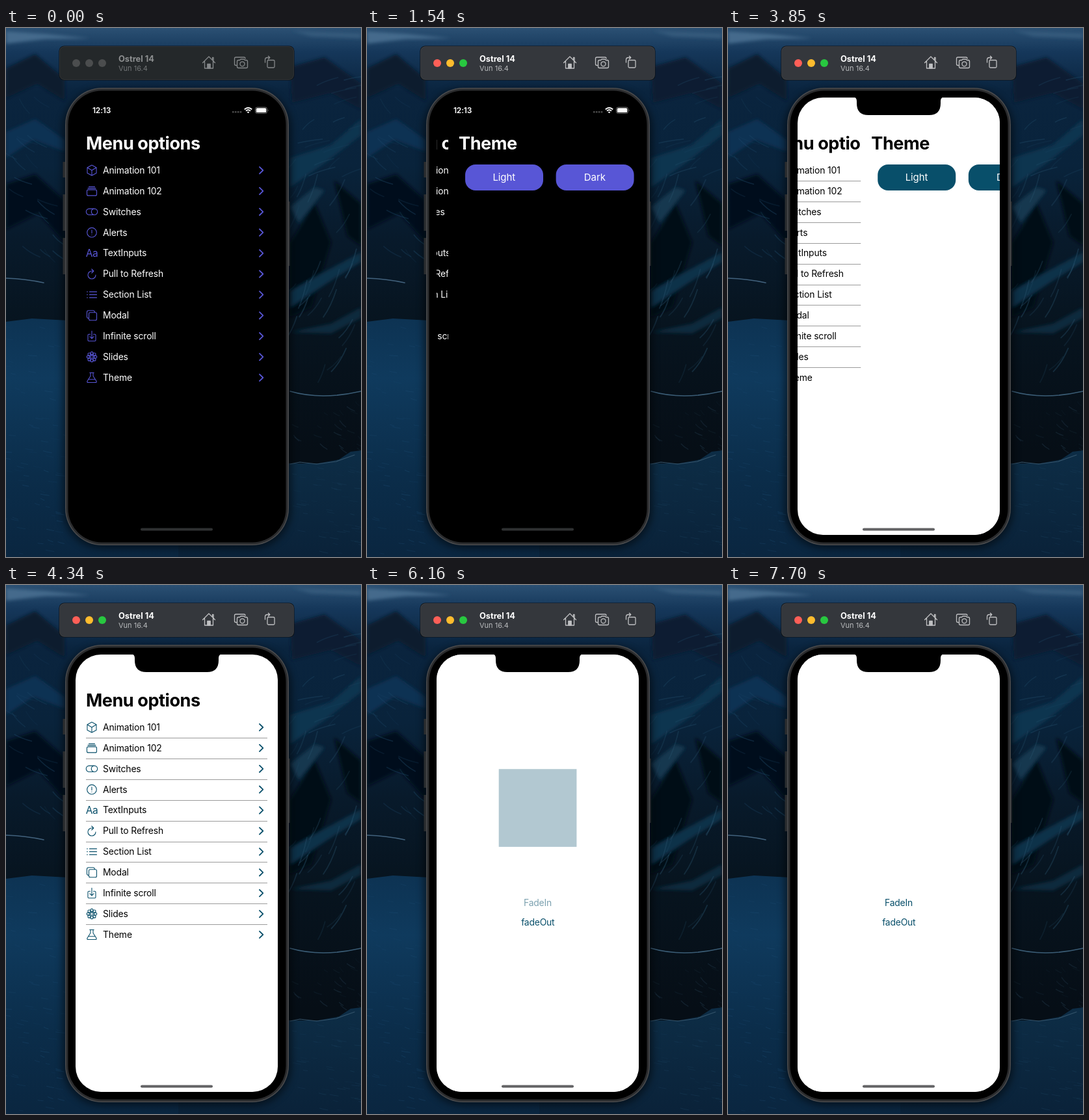
Recreate the animation shown at these times as an HTML page. Size 546x814 px, loop 8 s.

```html
<!DOCTYPE html>
<html lang="en">
<head>
<meta charset="utf-8">
<title>Menu and theme demo</title>
<style>
  html, body { margin: 0; width: 100%; height: 100%; overflow: hidden; background: #0a2035; }
  svg { display: block; width: 546px; height: 814px; font-family: Inter, sans-serif;
        --bg: #000; --fg: #fff; --pri: #5856d6; --line: transparent; --home: #2f3132; }
  svg.light { --bg: #fff; --fg: #000; --pri: #084f6a; --line: #9b9b9b; --home: #636365; }
  svg.light #status { display: none; }
  .bg { fill: var(--bg); }
  .pri { fill: var(--pri); }
  .title { font-size: 27.1px; font-weight: 700; letter-spacing: -.45px; fill: var(--fg); }
  .row text { font-size: 13.9px; letter-spacing: -.13px; fill: var(--fg); }
  .row .aa { font-size: 15.5px; letter-spacing: -.5px; fill: var(--pri); }
  .icon { fill: none; stroke: var(--pri); stroke-width: 1.1; stroke-linecap: round; stroke-linejoin: round; }
  .button text { font-size: 15px; letter-spacing: -.1px; fill: #fff; text-anchor: middle; }
  .link { font-size: 13.9px; letter-spacing: -.2px; fill: var(--pri); text-anchor: middle; }
  #bar { --bar: #34373c; --name: #fff; --sub: #b8babc; --tool: #bfc0c2; }
  #bar.idle { --bar: #24282a; --name: #8d8f90; --sub: #727577; --tool: #85888a; }
  #bar.idle circle.dot { fill: #4b4d4e; }
  .tool { fill: none; stroke: var(--tool); stroke-width: 1.3; stroke-linejoin: round; stroke-linecap: round; }
</style>
</head>
<body>
<svg id="stage" viewBox="0 0 546 814">
  <defs>
    <linearGradient id="land" x2="0" y2="1">
      <stop offset="0" stop-color="#2b5073"/><stop offset=".045" stop-color="#15375a"/>
      <stop offset=".12" stop-color="#0a243e"/><stop offset=".26" stop-color="#09233b"/>
      <stop offset=".4" stop-color="#081a2b"/><stop offset=".56" stop-color="#07141f"/>
      <stop offset=".8" stop-color="#060e16"/>
    </linearGradient>
    <linearGradient id="sea" x2="0" y2="1">
      <stop offset="0" stop-color="#0d3353"/><stop offset=".25" stop-color="#0f3a5d"/>
      <stop offset=".65" stop-color="#0b2d4a"/><stop offset="1" stop-color="#0a2640"/>
    </linearGradient>
    <linearGradient id="cove" x2="0" y2="1">
      <stop offset="0" stop-color="#0d2d46"/><stop offset="1" stop-color="#0a2239"/>
    </linearGradient>
    <filter id="soft" x="-30%" y="-30%" width="160%" height="160%"><feGaussianBlur stdDeviation="2.5"/></filter>
    <filter id="shade" x="-10%" y="-10%" width="120%" height="120%"><feGaussianBlur stdDeviation="6"/></filter>
    <clipPath id="screen"><rect x="107" y="107" width="311" height="673" rx="39"/></clipPath>
  </defs>

  <rect width="546" height="814" fill="url(#land)"/>
  <g filter="url(#soft)">
    <path d="M0 5L60 9L130 16L60 17L0 24Z" fill="#456a8c"/>
    <path d="M440 4L546 8V16L470 13Z" fill="#345a7c"/>
    <path d="M0 62L45 40L90 78V112L48 86L0 108Z" fill="#071a2d"/>
    <path d="M0 160L45 140L90 172V190L42 172L0 200Z" fill="#0d3152"/>
    <path d="M0 240L45 225L90 265V330L50 285L0 310Z" fill="#050f1a"/>
    <path d="M437 60L490 45L546 85V125L500 100L440 115Z" fill="#091c30"/>
    <path d="M437 200L500 180L546 140V165L490 208L437 245Z" fill="#113550"/>
    <path d="M437 275L475 245L490 250L450 300Z" fill="#123850"/>
    <path d="M437 330L475 270L500 330L470 430L437 445Z" fill="#050e17"/>
    <path d="M437 405L490 375L546 345V360L495 392L437 430Z" fill="#113149"/>
    <path d="M505 235L546 270V335L525 320Z" fill="#050f19"/>
    <path d="M437 468L500 455L546 430V446L500 470Z" fill="#102a3e"/>
  </g>
  <g id="ridges" fill="none" stroke-linecap="round"/>
  <path d="M0 452L40 447L95 450L265 640V814H0Z" fill="url(#sea)"/>
  <path d="M265 668L455 670L480 670L512 664L530 652L546 650V814H265Z" fill="url(#cove)"/>
  <g id="ripples" fill="none" stroke-linecap="round"/>
  <g fill="none" stroke-linecap="round">
    <path d="M0 385Q30 386 58 392" stroke="#42627d" stroke-width="1.5"/>
    <path d="M437 559Q485 573 546 559" stroke="#3b5d76" stroke-width="1.6"/>
    <path d="M437 671L452 668L478 671L508 667L536 657" stroke="#34536a" stroke-width="1.2"/>
  </g>

  <rect x="87" y="94" width="352" height="707" rx="61" fill="#000" opacity=".5" filter="url(#shade)"/>
  <path d="M87.500 206h5v24h-5zM87.500 256h5v56h-5zM87.500 323h5v56h-5zM434 267h2.500v99h-2.500z" fill="#2b2d2f"/>
  <rect x="91" y="92" width="344" height="704" rx="57" fill="#4a4b4d"/>
  <rect x="92.500" y="93.500" width="341" height="701" rx="55.500" fill="#2b2c2e"/>
  <rect x="95.500" y="96.500" width="335" height="695" rx="52" fill="#000"/>

  <g clip-path="url(#screen)">
    <g id="menu">
      <rect class="bg" x="107" y="107" width="420" height="673"/>
      <text class="title" x="123" y="187">Menu options</text>
    </g>
    <g id="page">
      <rect class="bg" x="107" y="107" width="311" height="673"/>
      <g id="theme">
        <text class="title" x="123" y="187">Theme</text>
        <g class="button" id="lightBtn"><rect class="pri" x="133" y="210" width="120" height="40" rx="16"/><text x="192.700" y="235.300">Light</text></g>
        <g class="button"><rect class="pri" x="272.600" y="210" width="120" height="40" rx="16"/><text x="332.300" y="235.300">Dark</text></g>
      </g>
      <g id="fade">
        <rect class="pri" id="box" x="202.700" width="119.700" height="119.700"/>
        <text class="link" id="fadeIn" x="262.500" y="493.500">FadeIn</text>
        <text class="link" id="fadeOut" x="262.800" y="523.500">fadeOut</text>
      </g>
    </g>
    <path d="M193 106Q198 107 198 113V116Q198 134 216 134H309Q327 134 327 116V113Q327 107 332 106Z" fill="#000"/>
    <rect x="207" y="769.500" width="111" height="4" rx="2" style="fill:var(--home)"/>
  </g>
  <g id="status" fill="#fff">
    <text x="133" y="131.200" font-size="12" font-weight="600" letter-spacing="-.2">12:13</text>
    <path d="M348 128h2.600v2.400h-2.600zm3.900 0h2.600v2.400h-2.600zm3.900 0h2.600v2.400h-2.600zm3.900 0h2.600v2.400h-2.600z" fill="#4a4a4a"/>
    <g fill="none" stroke="#fff" stroke-width="1.900"><path d="M366.800 125.300Q372.500 120 378.200 125.300M369 127.600Q372.500 124.400 376 127.600"/></g>
    <path d="M370.600 129.200Q372.500 127.600 374.400 129.200L372.500 131.200Z"/>
    <rect x="383.500" y="122" width="18" height="9.400" rx="2.800" fill="none" stroke="#777"/>
    <rect x="384.800" y="123.300" width="15.400" height="6.800" rx="1.600"/>
    <path d="M403 125.200q1.600 1.500 0 3z" fill="#888"/>
  </g>

  <g id="bar">
    <rect x="81.500" y="27.500" width="362" height="53" rx="8" fill="#0a0d10"/>
    <rect x="82.500" y="28.500" width="360" height="51" rx="7" style="fill:var(--bar)" stroke="#fff" stroke-opacity=".1"/>
    <circle class="dot" cx="108" cy="54" r="6" fill="#fe5f57"/>
    <circle class="dot" cx="128" cy="54" r="6" fill="#febc2e"/>
    <circle class="dot" cx="148" cy="54" r="6" fill="#28c840"/>
    <text x="173" y="52" font-size="12.800" font-weight="700" style="fill:var(--name)">Ostrel 14</text>
    <text x="173" y="66" font-size="11" style="fill:var(--sub)">Vun 16.4</text>
    <g class="tool">
      <path d="M302.500 53.500L312 44L321.500 53.500M305.500 51.500V62H318.500V51.500M317.500 49V45.500H319V50.500"/>
      <path d="M309.800 62V55.500H314.200V62Z" style="fill:var(--tool)"/>
      <path d="M354.500 57.500H353.500Q351.500 57.500 351.500 55.500V47Q351.500 45 353.500 45H366Q368 45 368 47"/>
      <path d="M357.500 49.500H359.500L361 48H366L367.500 49.500H369.500Q371.500 49.500 371.500 51.500V59.500Q371.500 61.500 369.500 61.500H357.500Q355.500 61.500 355.500 59.500V51.500Q355.500 49.500 357.500 49.500Z"/>
      <circle cx="363.500" cy="55.300" r="3.500"/>
      <rect x="402" y="49.500" width="11" height="11.500" rx="1.500"/>
      <path d="M398.500 53V49Q398.500 45.500 402 45.500H405.500M403.500 43.200L405.800 45.500L403.500 47.800"/>
    </g>
  </g>
</svg>

<script>
const $ = id => document.getElementById(id);
const circle = (x, y, r) => `M${x - r} ${y}a${r} ${r} 0 1 0 ${2 * r} 0a${r} ${r} 0 1 0 ${-2 * r} 0`;
const petals = [...Array(8).keys()].map(i =>
  circle(5.7 * Math.cos(i * Math.PI / 4), 5.7 * Math.sin(i * Math.PI / 4), 2)).join('');

// Icon paths are centred on 0,0
const rows = [
  ['Animation 101', 'M0-8L7-4.200V4.200L0 8L-7 4.200V-4.200ZM-7-4.200L0 0L7-4.200M0 0V8'],
  ['Animation 102', 'M-4.500-6.500H4.500M-6-4.300H6M-5.500-2H5.500Q7.500-2 7.500 0V5Q7.500 7 5.500 7H-5.500Q-7.500 7-7.500 5V0Q-7.500-2-5.500-2Z'],
  ['Switches', 'M-4-4.700H4A4.700 4.700 0 0 1 4 4.700H-4A4.700 4.700 0 0 1-4-4.700Z' + circle(4, 0, 4.7)],
  ['Alerts', circle(0, 0, 7.3) + 'M0-3.800V1M0 3.600V3.800'],
  ['TextInputs', ''],
  ['Pull to Refresh', 'M6 1.500A6 6 0 1 1 0-4.500H2.500M-.200-7.500L2.800-4.500L-.200-1.500'],
  ['Section List', 'M-3.500-4.500H7.500M-3.500 0H7.500M-3.500 4.500H7.500M-7.300-4.500H-6.700M-7.300 0H-6.700M-7.300 4.500H-6.700'],
  ['Modal', 'M-2.500-4.500H5.500Q7.500-4.500 7.500-2.500V5.500Q7.500 7.500 5.500 7.500H-2.500Q-4.500 7.500-4.500 5.500V-2.500Q-4.500-4.500-2.500-4.500ZM4.500-4.500Q4.500-7.500 2-7.500H-5Q-7.500-7.500-7.500-5V2Q-7.500 4.500-4.500 4.500'],
  ['Infinite scroll', 'M-2.500-3H-4.500Q-6-3-6-1.500V6Q-6 7.500-4.500 7.500H4.500Q6 7.500 6 6V-1.500Q6-3 4.500-3H2.500M0-8V3.500M-3 .600L0 3.600L3 .600'],
  ['Slides', petals + circle(0, 0, 2.2)],
  ['Theme', 'M-3.200-7.500H3.200M-2-7.500V-2.500L-6.800 5Q-8 7.500-5.500 7.500H5.500Q8 7.500 6.800 5L2-2.500V-7.500M-4.800 2.800H4.800'],
];
$('menu').insertAdjacentHTML('beforeend', rows.map(([label, icon], i) => {
  const y = 219 + i * 31.9;
  const mark = icon ? `<path class="icon" transform="translate(132 ${y})" d="${icon}"/>`
                    : `<text class="aa" x="122.800" y="${y + 5.5}">Aa</text>`;
  const rule = i < rows.length - 1 ? `<path d="M123 ${Math.round(y + 16) + .5}h279" style="stroke:var(--line)"/>` : '';
  return `<g class="row" id="row${i}">${mark}<text x="149" y="${y + 4.8}">${label}</text>
    <path class="icon" style="stroke-width:1.8" d="M390 ${y - 5.2}l5.300 5.200l-5.300 5.200"/></g>${rule}`;
}).join(''));

// Wallpaper texture
let seed = 7;
const rand = (a, b) => a + (b - a) * ((seed = seed * 16807 % 2147483647) / 2147483647);
function strokes(n, x0, x1, y0, y1, dx, dy, colour, width) {
  let out = '';
  while (n--) {
    const x = rand(x0, x1), y = rand(y0, y1), w = rand(dx * .4, dx), h = rand(dy * .3, dy);
    out += `<path d="M${x} ${y}q${w * .4} ${h * .6} ${w} ${h}" stroke="${colour}" stroke-width="${width}" opacity="${rand(.1, .4)}"/>`;
  }
  return out;
}
$('ridges').innerHTML =
  strokes(22, -20, 80, 60, 380, 34, 22, '#225070', 1.6) +
  strokes(16, 437, 530, 60, 230, 40, -18, '#24506e', 1.6) +
  strokes(24, 445, 540, 200, 520, -24, 46, '#2b556f', 1.8) +
  strokes(22, 437, 546, 575, 650, 12, 10, '#274052', 1.5);
$('ripples').innerHTML =
  strokes(70, -8, 90, 458, 810, 14, 3, '#1f5078', 1) +
  strokes(50, 437, 546, 675, 810, 14, 3, '#1f4866', 1);

const clamp = x => Math.min(1, Math.max(0, x));
const ease = x => { x = clamp(x); return x * x * (3 - 2 * x); };
// Critically damped spring used by screen transitions
const spring = ms => { const x = Math.max(0, ms) * .01826; return 1 - (1 + x) * Math.exp(-x); };
const press = (t, down, up, low) => t < down ? 1 : low + (1 - low) * ease((t - up) / 250);

function bounce(x) {
  x = clamp(x);
  const k = 7.5625, d = 2.75;
  if (x < 1 / d) return k * x * x;
  if (x < 2 / d) return k * (x - 1.5 / d) ** 2 + .75;
  if (x < 2.5 / d) return k * (x - 2.25 / d) ** 2 + .9375;
  return k * (x - 2.625 / d) ** 2 + .984375;
}

function draw() {
  const t = Math.floor(performance.now() % 8000 / 70) * 70;
  $('stage').classList.toggle('light', t >= 2730);
  $('bar').classList.toggle('idle', t < 1190);

  const open = spring(t - 1290) - spring(t - 3788) + spring(t - 4943);
  $('menu').setAttribute('transform', `translate(${-93.3 * open} 0)`);
  $('page').setAttribute('transform', `translate(${311 * (1 - open)} 0)`);
  $('theme').style.display = t < 4700 ? '' : 'none';
  $('fade').style.display = t < 4700 ? 'none' : '';

  $('row10').style.opacity = press(t, 1190, 1290, .8);
  $('lightBtn').style.opacity = press(t, 2590, 2640, .8);
  $('row0').style.opacity = press(t, 4830, 5010, .8);
  $('fadeIn').style.opacity = press(t, 6020, 6050, .2);
  $('fadeOut').style.opacity = press(t, 7280, 7380, .2);

  $('box').setAttribute('y', 273.4 + 79.7 * bounce((t - 6049) / 870));
  $('box').style.opacity = ease((t - 6049) / 300) - ease((t - 7385) / 300);
  requestAnimationFrame(draw);
}
draw();
</script>
</body>
</html>
```
